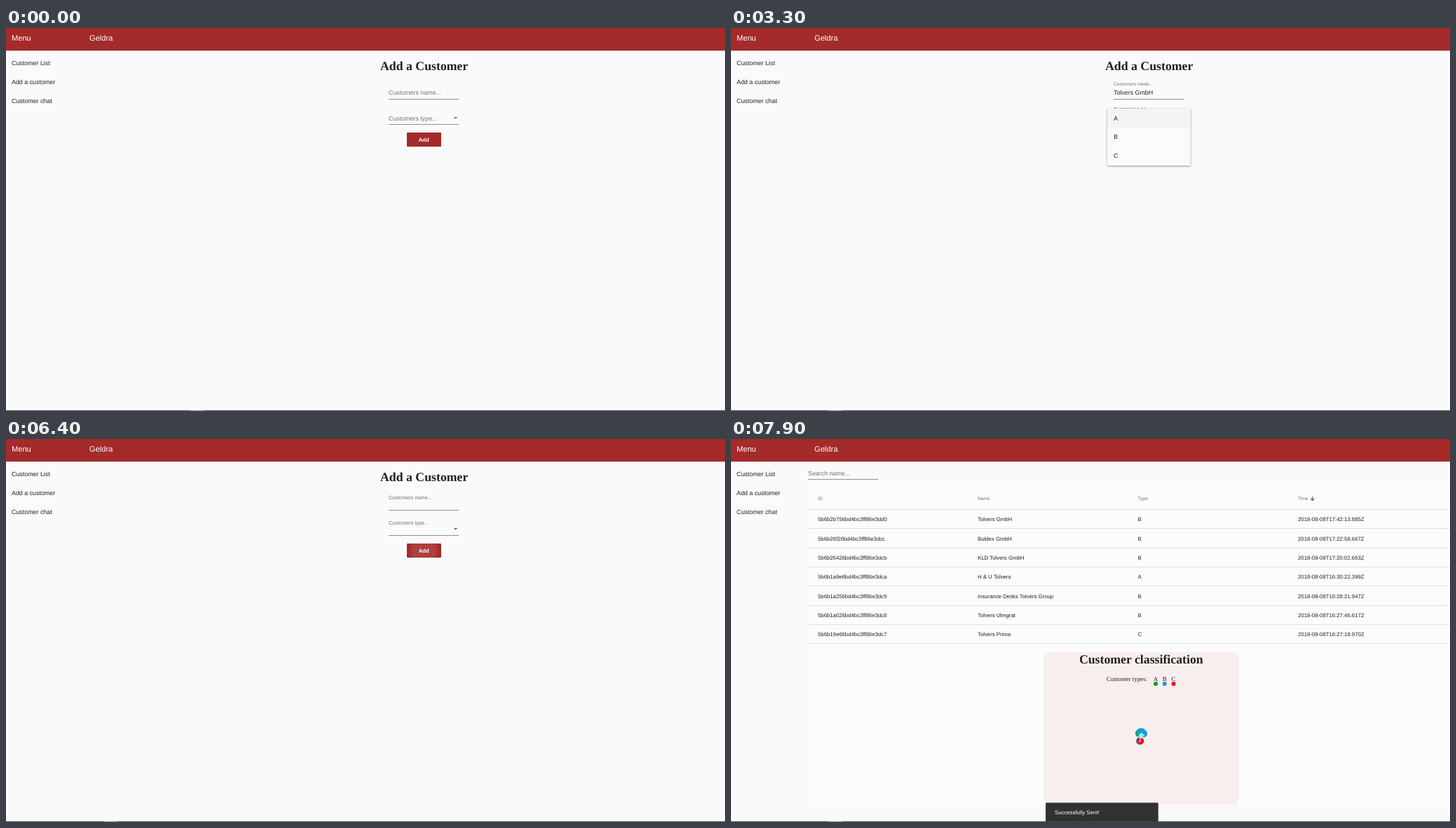
Recreate the animation shown at these times as an HTML page. Size 1026 px wide and 546 px high, loop 8000 ms.

```html
<!DOCTYPE html>
<html lang="en">
<head>
<meta charset="utf-8">
<title>Add a customer</title>
<style>
html, body { margin: 0; width: 100%; height: 100%; overflow: hidden; background: #fafafa; }
svg {
  display: block; width: 1026px; height: 546px;
  font: 8.89px "Liberation Sans", Arial, sans-serif;
  fill: #212121; text-rendering: geometricPrecision;
  --brown: #a52a2a; --grey: rgba(0,0,0,.54);
}
.anim { animation: 8s step-end infinite; }
.title { font: bold 17.78px "Liberation Serif", "Times New Roman", serif; }
.serif { font-family: "Liberation Serif", "Times New Roman", serif; }
.bar { font-size: 11.1px; fill: #fff; }
.small { font-size: 7.78px; }
.head { font-size: 6.67px; }
.head, .hint { fill: var(--grey); }
.rule { fill: rgba(0,0,0,.42); }
.brown { fill: var(--brown); }
.middle { text-anchor: middle; }

/* --p runs from 0 (resting label) to 1 (floating label) */
.label {
  transform: translateY(calc(var(--p) * -13.4px)) scale(calc(1 - .25 * var(--p)));
  transform-origin: 0 0;
}
.accent { transform-box: fill-box; transform-origin: center; fill: var(--brown); }

#task { animation-name: task; }
#form { animation-name: form; }
#nameLabel { animation-name: nameLabel; }
#nameAccent { animation-name: nameAccent; }
#nameValue { animation-name: nameValue; }
#caret { animation-name: caret; }
#typeLabel { animation-name: typeLabel; }
#typeAccent { animation-name: typeAccent; }
#typeValue { animation-name: typeValue; }
#arrow { animation-name: arrow; }
#panel { animation-name: panel; transform-origin: 596px 115px; filter: drop-shadow(0 1.2px 1.6px rgba(0,0,0,.4)); }
#options { animation-name: options; }
#hover { animation-name: hover; }
#ripple { animation-name: ripple; }
#press { animation-name: press; }
#snack { animation-name: snack; }
#list { animation-name: list; }
#data { animation-name: data; }
#cluster { animation-name: cluster; transform: translate(585px, 423.5px) rotate(var(--turn)); }
#cluster circle { transform: translate(calc(var(--x) * var(--k) * 1px), calc(var(--y) * var(--k) * 1px)); }
#links { transform: scale(var(--k)); fill: none; stroke: #b9dde6; stroke-width: 1.5; }

@keyframes task { 0% { transform: translateX(124px); } 6.25%, 100% { transform: none; } }
@keyframes form { 0% { opacity: 1; } 87.5%, 100% { opacity: 0; } }
@keyframes list { 0% { opacity: 0; } 87.5%, 100% { opacity: 1; } }
@keyframes data { 0% { opacity: 0; } 88.75%, 100% { opacity: 1; } }

@keyframes nameLabel {
  0% { --p: 0; fill: var(--grey); }
  6.25% { --p: .15; fill: var(--brown); }
  7.5% { --p: .7; fill: var(--brown); }
  8.75% { --p: .92; fill: var(--brown); }
  10% { --p: .99; fill: var(--brown); }
  11.25% { --p: 1; fill: var(--brown); }
  36.25% { --p: 1; fill: var(--grey); }
  80% { --p: .7; fill: var(--grey); }
  81.25% { --p: .2; fill: var(--grey); }
  82.5% { --p: .05; fill: var(--grey); }
  83.75%, 100% { --p: 0; fill: var(--grey); }
}
@keyframes typeLabel {
  0% { --p: 0; fill: var(--grey); }
  36.25% { --p: 0; fill: var(--brown); }
  37.5% { --p: .6; fill: var(--brown); }
  38.75% { --p: .9; fill: var(--brown); }
  40% { --p: .98; fill: var(--brown); }
  41.25% { --p: 1; fill: var(--brown); }
  78.75% { --p: 1; fill: var(--grey); }
  80% { --p: .7; fill: var(--grey); }
  81.25% { --p: .2; fill: var(--grey); }
  82.5% { --p: .05; fill: var(--grey); }
  83.75%, 100% { --p: 0; fill: var(--grey); }
}
@keyframes nameAccent {
  0% { opacity: 0; transform: scaleX(.5); }
  6.25% { opacity: .5; transform: scaleX(.65); }
  7.5% { opacity: 1; transform: scaleX(.92); }
  8.75% { opacity: 1; transform: scaleX(.98); }
  10% { opacity: 1; transform: none; }
  36.25%, 100% { opacity: 0; transform: none; }
}
@keyframes typeAccent {
  0% { opacity: 0; transform: scaleX(.5); }
  36.25% { opacity: 1; transform: scaleX(.94); }
  37.5% { opacity: 1; transform: none; }
  78.75%, 100% { opacity: 0; transform: none; }
}
@keyframes nameValue { 0% { opacity: 0; } 20% { opacity: 1; } 80%, 100% { opacity: 0; } }
@keyframes typeValue { 0% { opacity: 0; } 60% { opacity: 1; } 80%, 100% { opacity: 0; } }
@keyframes caret {
  0% { opacity: 0; transform: none; }
  6.25% { opacity: 1; transform: none; }
  11.25% { opacity: 0; transform: none; }
  17.5% { opacity: 1; transform: none; }
  20% { opacity: 1; transform: translateX(58px); }
  25% { opacity: 0; transform: translateX(58px); }
  31.25% { opacity: 1; transform: translateX(58px); }
  36.25%, 100% { opacity: 0; transform: none; }
}
@keyframes arrow { 0% { fill: var(--grey); } 36.25% { fill: var(--brown); } 78.75%, 100% { fill: var(--grey); } }
@keyframes panel {
  0% { opacity: 0; transform: scaleY(0); }
  37.5% { opacity: .85; transform: scaleY(.85); }
  38.75% { opacity: 1; transform: none; }
  60% { opacity: .8; transform: none; }
  61.25% { opacity: .2; transform: none; }
  62.5%, 100% { opacity: 0; transform: none; }
}
@keyframes options { 0% { opacity: 0; } 38.75% { opacity: .6; } 40%, 100% { opacity: 1; } }
@keyframes hover { 0% { opacity: 0; } 55%, 100% { opacity: 1; } }
@keyframes ripple {
  0% { opacity: 0; transform: scale(0); }
  57.5% { opacity: .1; transform: scale(50.5); }
  58.75% { opacity: .1; transform: scale(85); }
  60%, 100% { opacity: .1; transform: scale(115); }
}
@keyframes press {
  0% { opacity: 0; transform: scale(0); }
  78.75% { opacity: .1; transform: scale(9); }
  80% { opacity: .1; transform: scale(19); }
  81.25% { opacity: .1; transform: scale(28); }
  83.75%, 100% { opacity: .06; transform: scale(28); }
}
@keyframes snack {
  0% { transform: translateY(28px); }
  81.25% { transform: translateY(18px); }
  82.5% { transform: translateY(4px); }
  83.75%, 100% { transform: none; }
}
@keyframes cluster {
  0% { --k: 1.9; --turn: -60deg; }
  90% { --k: 1.7; --turn: -46deg; }
  91.25% { --k: 1.5; --turn: -35deg; }
  92.5% { --k: 1.35; --turn: -26deg; }
  93.75% { --k: 1.25; --turn: -18deg; }
  95% { --k: 1.15; --turn: -12deg; }
  96.25% { --k: 1.08; --turn: -7deg; }
  97.5% { --k: 1.04; --turn: -3deg; }
  98.75%, 100% { --k: 1; --turn: 0deg; }
}
</style>
</head>
<body>
<svg viewBox="0 0 1026 546">
  <clipPath id="optionClip"><rect x="537" y="142" width="118.5" height="27"/></clipPath>
  <clipPath id="buttonClip"><rect x="572" y="149" width="49" height="20" rx="1"/></clipPath>

  <rect width="1026" height="546" fill="#fafafa"/>
  <rect class="brown" width="1026" height="32.3"/>
  <g class="bar"><text x="8" y="18.4">Menu</text><text x="119" y="18.4">Geldra</text></g>
  <text x="8" y="53">Customer List</text>
  <text x="8" y="79.8">Add a customer</text>
  <text x="8" y="106.6">Customer chat</text>

  <g id="form" class="anim">
    <text class="title" x="534" y="60">Add a Customer</text>

    <rect class="rule" x="546" y="101" width="100.5" height="1"/>
    <rect id="nameAccent" class="accent anim" x="546" y="100.5" width="100.5" height="1.5"/>
    <g transform="translate(546 95.3)">
      <text id="nameLabel" class="label anim">Customers name...</text>
      <text id="nameValue" class="anim">Tolvers GmbH</text>
    </g>
    <rect id="caret" class="brown anim" x="546" y="87" width="1" height="10"/>

    <rect class="rule" x="546" y="137" width="100.5" height="1"/>
    <rect id="typeAccent" class="accent anim" x="546" y="137" width="100.5" height="1.4"/>
    <g transform="translate(546 131.6)">
      <text id="typeLabel" class="label anim">Customers type...</text>
      <text id="typeValue" class="anim">B</text>
    </g>
    <path id="arrow" class="anim" d="M638.8 127h5.6l-2.8 2.8z"/>

    <rect x="572" y="149.5" width="49" height="20" rx="1" fill="#000" opacity=".15"/>
    <rect class="brown" x="572" y="149" width="49" height="20" rx="1"/>
    <g clip-path="url(#buttonClip)"><g transform="translate(596.5 159)">
      <circle id="press" class="anim" r="1" fill="#fff"/>
    </g></g>
    <text class="small middle" x="596.3" y="161.6" fill="#fff" font-weight="bold">Add</text>

    <g id="panel" class="anim">
      <rect x="537" y="115" width="118.5" height="81" rx="1" fill="#fbfbfb"/>
      <rect x="537" y="115" width="118.5" height="27" fill="#f4f4f4"/>
      <rect id="hover" class="anim" x="537" y="142" width="118.5" height="27" fill="#f4f4f4"/>
      <g clip-path="url(#optionClip)"><g transform="translate(553 155.5)">
        <circle id="ripple" class="anim" r="1" fill="#000"/>
      </g></g>
      <g id="options" class="anim">
        <text x="546" y="131.6">A</text><text x="546" y="158.4">B</text><text x="546" y="185.2">C</text>
      </g>
    </g>
  </g>

  <g id="list" class="anim">
    <text class="hint" x="110" y="52">Search name...</text>
    <rect class="rule" x="110" y="57" width="100.5" height="1"/>
    <rect x="110" y="68" width="916" height="453" fill="#fcfcfc"/>
    <g class="head">
      <text x="124" y="87.2">ID</text><text x="352" y="87.2">Name</text>
      <text x="580.5" y="87.2">Type</text><text x="809" y="87.2">Time</text>
    </g>
    <path d="M829.7 82v5.5m-2.5-2.5l2.5 2.6 2.5-2.6" fill="none" stroke="#555" stroke-width="1.1"/>
    <rect x="110" y="100" width="916" height="1" fill="#e2e2e2"/>

    <g id="data" class="anim">
      <g id="rows" class="small"></g>
      <rect x="446" y="304" width="278.5" height="217" rx="8" fill="#f8eeed"/>
      <text class="title middle" x="585.3" y="320">Customer classification</text>
      <g class="serif">
        <text x="536" y="344.5">Customer types:</text>
        <g class="middle">
          <text x="606" y="344.5">A</text><text x="618.7" y="344.5">B</text><text x="631.5" y="344.5">C</text>
        </g>
      </g>
      <circle cx="606" cy="349" r="3" fill="#109a18"/>
      <circle cx="618.7" cy="349" r="3" fill="#109be2"/>
      <circle cx="631.5" cy="349" r="3" fill="#f00"/>
      <g id="cluster" class="anim" fill="#109be2">
        <circle r="5.3" style="--x:-2.8;--y:-4" fill="#12a52a"/>
        <circle r="5.3" style="--x:-1;--y:-6"/>
        <circle r="5.3" style="--x:1.5;--y:-6"/>
        <circle r="5.3" style="--x:3.8;--y:-3.5"/>
        <circle r="5.3" style="--x:-1.8;--y:7"/>
        <circle r="5" style="--x:-.8;--y:7" fill="#f00"/>
        <circle r="3.2" style="--x:0;--y:0" fill="#b9dde6"/>
        <path id="links" d="M-3-1L1-4 4-1 0 1-2 6M-3 9L0 6"/>
      </g>
    </g>
  </g>

  <g id="snack" class="anim">
    <rect x="449" y="518.5" width="160.7" height="28" rx="1" fill="#323232"/>
    <text class="small" x="462" y="535" fill="#fff">Successfully Sent!</text>
  </g>
  <rect y="545" width="1026" height="1" fill="#4a4a4a"/>
  <rect id="task" class="anim" x="139" y="545" width="20" height="1" fill="#8a8a8a"/>
</svg>
<script>
const columns = [124, 352, 580.5, 809];
const rowStep = 27.33;
const customers = [
  ["5b6b2b756bd4bc3ff86e3dd0", "Tolvers GmbH", "B", "17:42:13.885"],
  ["5b6b26f26bd4bc3ff86e3dcc", "Buldex GmbH", "B", "17:22:58.667"],
  ["5b6b26426bd4bc3ff86e3dcb", "KLD Tolvers GmbH", "B", "17:20:02.663"],
  ["5b6b1a9e6bd4bc3ff86e3dca", "H & U Tolvers", "A", "16:30:22.399"],
  ["5b6b1a256bd4bc3ff86e3dc9", "Insurance Desks Tolvers Group", "B", "16:28:21.947"],
  ["5b6b1a026bd4bc3ff86e3dc8", "Tolvers Ulmgrat", "B", "16:27:46.617"],
  ["5b6b19e66bd4bc3ff86e3dc7", "Tolvers Prima", "C", "16:27:18.970"]
];
const rows = document.getElementById("rows");

function add(tag, attributes, text = "") {
  const node = document.createElementNS(rows.namespaceURI, tag);
  for (const key in attributes) node.setAttribute(key, attributes[key]);
  node.textContent = text;
  rows.append(node);
}

customers.forEach(([id, name, type, time], i) => {
  [id, name, type, `2018-08-08T${time}Z`].forEach((text, column) =>
    add("text", { x: columns[column], y: 117.2 + i * rowStep }, text));
  add("rect", { x: 110, y: Math.round(100 + (i + 1) * rowStep), width: 916, height: 1, fill: "#e2e2e2" });
});
</script>
</body>
</html>
```
